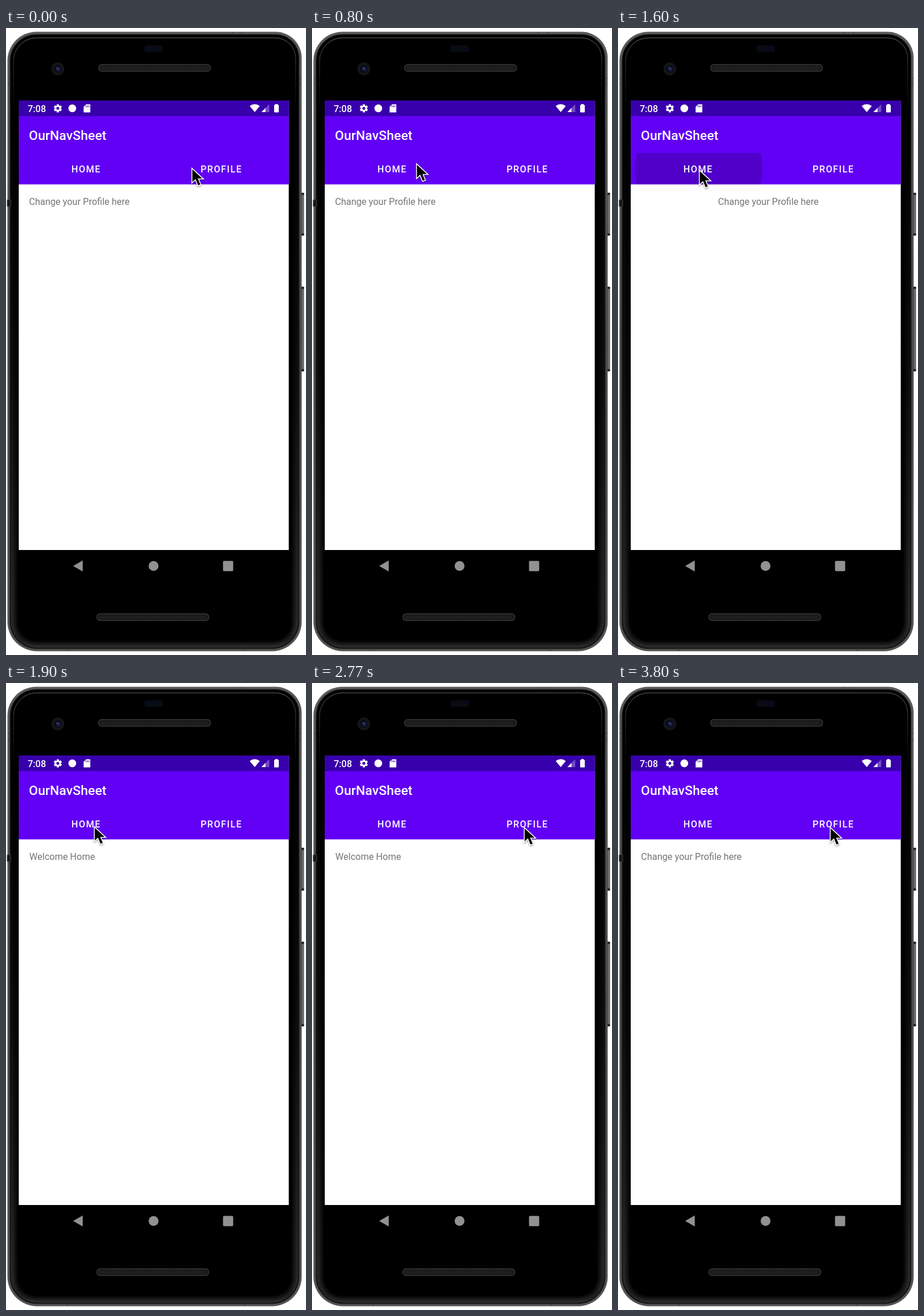
An HTML page with a canvas that plays this animation: 518 by 1081 pixels, repeating every 3.96 s.

```html
<!DOCTYPE html>
<html lang="en">
<head>
<meta charset="utf-8">
<title>Tabs demo</title>
<style>
  html, body { margin: 0; width: 100%; height: 100%; overflow: hidden; background: #fff; }
  canvas { display: block; width: 518px; height: 1081px; }
</style>
</head>
<body>
<canvas id="stage"></canvas>
<script>
const W = 518, H = 1081, LOOP = 3960, FRAME = 1000 / 30;
const canvas = document.getElementById('stage');
const ctx = canvas.getContext('2d');
const dpr = window.devicePixelRatio || 1;
canvas.width = W * dpr;
canvas.height = H * dpr;

const SCREEN = { x: 22, y: 125, w: 466.5, h: 775 };
const TAB_Y = 215.5, TAB_H = 54.1, TAB_W = SCREEN.w / 2;
const SLIDE_MS = 200, RIPPLE_IN = 225, RIPPLE_OUT = 150;

// Each tap: press time, page slide start, touched point, tab index
const taps = [
  { press: 1480, slide: 1587, x: 140, y: 245, tab: 0 },
  { press: 3050, slide: 3150, x: 366, y: 248, tab: 1 }
];

// Pointer tip: time, x, y
const path = [
  [0, 320.5, 240.6], [200, 322, 241], [370, 306, 241], [530, 266, 241],
  [680, 203, 237], [800, 180, 233], [1180, 180, 233], [1430, 140, 244],
  [1700, 140, 244], [1900, 152, 246.6], [2090, 265, 249], [2270, 359, 249],
  [2400, 367, 249], [2770, 366, 248], [3960, 366, 248]
];

const clamp01 = v => Math.min(1, Math.max(0, v));
const mix = (a, b, t) => a + (b - a) * t;
const quintOut = t => 1 - (1 - t) ** 5;

// cubic-bezier(.4, 0, .2, 1), solved by bisection
function standardEase(x) {
  let lo = 0, hi = 1;
  for (let i = 0; i < 20; i++) {
    const s = (lo + hi) / 2, r = 1 - s;
    if (1.2 * r * r * s + 0.6 * r * s * s + s ** 3 < x) lo = s; else hi = s;
  }
  return lo * lo * (3 - 2 * lo);
}

// Monotone cubic slope at key i for coordinate c
function slope(i, c) {
  if (i === 0 || i === path.length - 1) return 0;
  const rate = j => (path[j + 1][c] - path[j][c]) / (path[j + 1][0] - path[j][0]);
  const a = rate(i - 1), b = rate(i);
  return a * b <= 0 ? 0 : 2 * a * b / (a + b);
}

function pointerAt(t) {
  let i = 0;
  while (i < path.length - 2 && t >= path[i + 1][0]) i++;
  const p = path[i], q = path[i + 1], d = q[0] - p[0], u = (t - p[0]) / d;
  return [1, 2].map(c => {
    const s = u * u * (3 - 2 * u);
    return mix(p[c], q[c], s)
      + d * (slope(i, c) * u * (1 - u) ** 2 - slope(i + 1, c) * u * u * (1 - u));
  });
}

function box(x, y, w, h, r, fill, stroke, line = 1) {
  ctx.beginPath();
  ctx.roundRect(x, y, w, h, r);
  paint(fill, stroke, line);
}

function disc(x, y, r, fill, stroke, line = 1) {
  ctx.beginPath();
  ctx.arc(x, y, r, 0, Math.PI * 2);
  paint(fill, stroke, line);
}

function poly(points, fill) {
  ctx.beginPath();
  points.forEach(([x, y]) => ctx.lineTo(x, y));
  ctx.closePath();
  paint(fill);
}

function paint(fill, stroke, line) {
  if (fill) { ctx.fillStyle = fill; ctx.fill(); }
  if (stroke) { ctx.strokeStyle = stroke; ctx.lineWidth = line; ctx.stroke(); }
}

function text(str, x, y, size, weight, color, spacing = 0) {
  ctx.font = `${weight} ${size}px Roboto, sans-serif`;
  ctx.letterSpacing = spacing + 'px';
  ctx.fillStyle = color;
  ctx.fillText(str, x, y);
}

function gradient(x0, y0, x1, y1, ...colors) {
  const g = ctx.createLinearGradient(x0, y0, x1, y1);
  colors.forEach((c, i) => g.addColorStop(i / (colors.length - 1), c));
  return g;
}

function speaker(x, y) {
  box(x, y, 193, 11.5, 5, '#191919', '#383838', 1.4);
  ctx.strokeStyle = '#2b2b2b';
  ctx.lineWidth = 5;
  ctx.setLineDash([1, 2]);
  ctx.beginPath();
  ctx.moveTo(x + 5, y + 6);
  ctx.lineTo(x + 188, y + 6);
  ctx.stroke();
  ctx.setLineDash([]);
}

function sideButton(y, h) {
  box(509, y, 5.5, h, 1.5, gradient(509, 0, 515, 0, '#2a2a2a', '#7b7b7b', '#3c3c3c'));
  box(510, y, 4.5, 4, 1, '#222');
  box(510, y + h - 4, 4.5, 4, 1, '#222');
}

// Phone outline, moved inwards by d
function shell(d, fill, stroke, line) {
  box(2.5 + d, 6.5 + d, 508 - 2 * d, 1068 - 2 * d, [50 - d, 45 - d, 51 - d, 51 - d],
    fill, stroke, line);
}

function drawPhone() {
  sideButton(284, 74);
  sideButton(446, 146);
  shell(0, gradient(0, 6, 0, 1074, '#565656', '#3c3c3c', '#4a4a4a'));
  shell(1.5, null, '#616161', 1);
  shell(5, '#000', '#131313', 1.5);

  // Sheen that grows towards the bottom and fades inwards
  const sheen = gradient(0, 120, 0, 1074, 'rgba(255,255,255,0)',
    'rgba(255,255,255,.06)', 'rgba(255,255,255,.2)');
  for (let i = 0; i < 12; i++) {
    ctx.globalAlpha = 1 - i / 12;
    shell(6.5 + i, null, sheen, 1);
  }
  ctx.globalAlpha = 1;
  shell(10.5, null, gradient(0, 17, 0, 160, '#666', 'rgba(40,40,40,0)'), 1);

  ctx.fillStyle = '#333';
  for (const [x, y] of [[3, 86], [3, 97], [505, 86], [505, 97]]) ctx.fillRect(x, y, 5, 1);
  for (const x of [390, 406]) ctx.fillRect(x, 7, 1, 5);
  for (const x of [105, 412]) ctx.fillRect(x, 1069, 1, 5);
  box(2, 296, 6, 12, 1, '#171717', '#444');

  disc(89.5, 70.5, 10.5, '#141416', '#1d1d1f', 1);
  disc(89.5, 70.5, 6.5, '#090b1a');
  disc(90.5, 71, 3.5, '#1b2050');
  disc(88.8, 69.3, 1.2, '#565c90');
  box(239, 30, 32, 11, 4, '#080b15');
  speaker(160, 63);
  speaker(157, 1010);

  const nav = '#919191';
  poly([[116, 927.5], [132.5, 918], [132.5, 937]], nav);
  disc(254.8, 927.5, 8.5, nav);
  box(374.7, 918.7, 17.6, 17.8, 2, nav);
}

function gear(x, y) {
  ctx.save();
  ctx.translate(x, y);
  ctx.fillStyle = '#fff';
  for (let i = 0; i < 6; i++) {
    ctx.fillRect(-1.9, -7, 3.8, 4);
    ctx.rotate(Math.PI / 3);
  }
  disc(0, 0, 3.9, null, '#fff', 2.8);
  ctx.restore();
}

function drawStatus() {
  const bar = '#3800ac';
  ctx.fillStyle = bar;
  ctx.fillRect(SCREEN.x, SCREEN.y, SCREEN.w, 27);
  text('7:08', 37.5, 144.5, 16, 500, '#fff');
  gear(89.5, 138.5);
  disc(114.5, 138.5, 6.7, '#fff');
  poly([[138.5, 131.5], [145.5, 131.5], [145.5, 145.5], [134, 145.5], [134, 136]], '#fff');
  ctx.fillStyle = bar;
  for (const x of [137.5, 140, 142.5]) ctx.fillRect(x, 133.5, 1.1, 3);

  ctx.beginPath();
  ctx.moveTo(429.5, 145);
  ctx.lineTo(420.8, 134.4);
  ctx.quadraticCurveTo(429.5, 128.2, 438.2, 134.4);
  ctx.closePath();
  paint('#fff');
  poly([[441, 145], [454.5, 131.5], [454.5, 145]], 'rgba(255,255,255,.3)');
  poly([[441, 145], [448, 138], [448, 145]], '#fff');
  box(463, 132.5, 8, 13, 1, '#fff');
  ctx.fillRect(465, 131, 4, 2);
}

function drawRipple(tap, t) {
  const age = t - tap.press;
  if (age < 0 || age > RIPPLE_IN + RIPPLE_OUT) return;
  const x = SCREEN.x + tap.tab * TAB_W, p = standardEase(clamp01(age / RIPPLE_IN));
  const alpha = clamp01(age / 75) * (1 - clamp01((age - RIPPLE_IN) / RIPPLE_OUT));
  ctx.save();
  ctx.beginPath();
  ctx.rect(x, TAB_Y, TAB_W, TAB_H);
  ctx.clip();
  disc(mix(tap.x, x + TAB_W / 2, p), mix(tap.y, TAB_Y + TAB_H / 2, p),
    mix(TAB_W * 0.3, Math.hypot(TAB_W, TAB_H) / 2, p), `rgba(0,0,0,${0.18 * alpha})`);
  ctx.restore();
}

function drawScreen(t) {
  ctx.save();
  ctx.beginPath();
  ctx.rect(SCREEN.x, SCREEN.y, SCREEN.w, SCREEN.h);
  ctx.clip();
  ctx.fillStyle = '#fff';
  ctx.fillRect(SCREEN.x, SCREEN.y, SCREEN.w, SCREEN.h);

  const [home, profile] = taps.map(tap => quintOut(clamp01((t - tap.slide) / SLIDE_MS)));
  const shift = Math.round((home - profile) * SCREEN.w);
  text('Change your Profile here', 39.8 + shift, 305.3, 16, 400, '#757575');
  text('Welcome Home', 39.8 + shift - SCREEN.w, 305.3, 16, 400, '#757575');

  ctx.fillStyle = '#6200f5';
  ctx.fillRect(SCREEN.x, SCREEN.y, SCREEN.w, TAB_Y + TAB_H - SCREEN.y);
  drawStatus();
  text('OurNavSheet', 39.5, 192.8, 22.7, 500, '#fff');
  taps.forEach(tap => drawRipple(tap, t));
  text('HOME', 113.1, 249, 15.9, 500, '#fff', 1.42);
  text('PROFILE', 336, 249, 15.9, 500, '#fff', 1.42);
  ctx.restore();
}

function drawPointer([x, y]) {
  ctx.save();
  ctx.translate(x, y);
  ctx.beginPath();
  for (const [px, py] of [[1.2, 2.8], [1.2, 25], [6.8, 19.8], [11.3, 30.6],
    [15, 29], [10.6, 18.8], [18.4, 18.8]]) ctx.lineTo(px, py);
  ctx.closePath();
  ctx.shadowColor = 'rgba(0,0,0,.4)';
  ctx.shadowBlur = 3 * dpr;
  ctx.shadowOffsetY = 1.5 * dpr;
  paint(null, '#fff', 3);
  ctx.shadowColor = 'transparent';
  paint('#000');
  ctx.restore();
}

function draw(t) {
  ctx.setTransform(dpr, 0, 0, dpr, 0, 0);
  ctx.fillStyle = '#fff';
  ctx.fillRect(0, 0, W, H);
  drawPhone();
  drawScreen(t);
  drawPointer(pointerAt(t));
}

const start = performance.now();
function tick() {
  const t = (performance.now() - start) % LOOP;
  draw(Math.min(LOOP, Math.floor((t + 5) / FRAME) * FRAME));
  requestAnimationFrame(tick);
}
tick();
</script>
</body>
</html>
```
